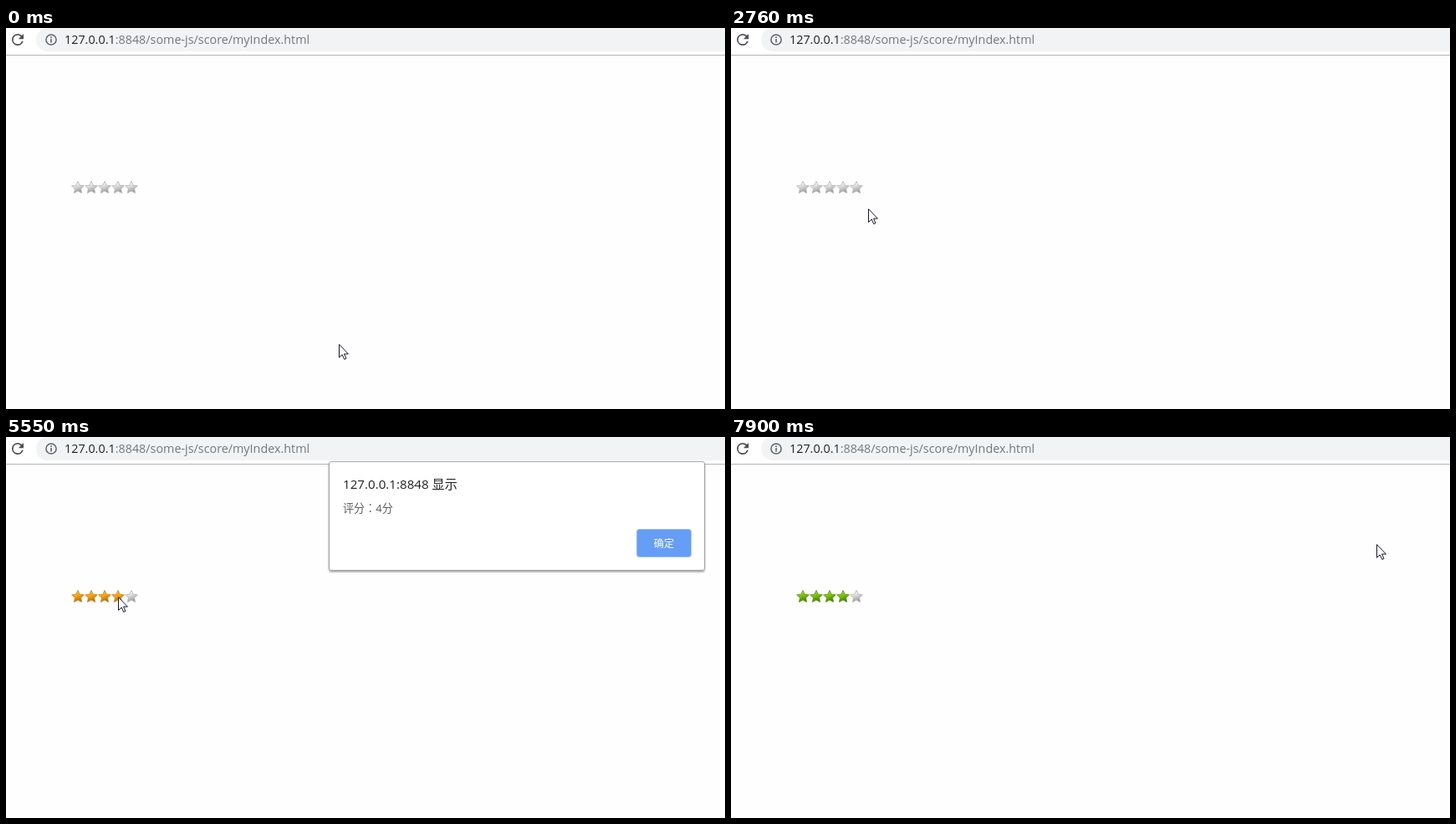
An HTML page for the animation above (8 s loop, 860 by 456 pixels).

```html
<!DOCTYPE html>
<html lang="zh-CN">
<head>
<meta charset="utf-8">
<title>Star rating</title>
<style>
  html, body { margin: 0; width: 100%; height: 100%; overflow: hidden; background: #fefefe; }
  svg { display: block; width: 100vw; height: 100vh; }
  text { font-family: "Open Sans", "Noto Sans CJK SC", "Noto Sans CJK", sans-serif; }
  .colon { font-family: "Noto Sans CJK TC", "Noto Sans CJK", sans-serif; }
  .silver { fill: url(#silver); stroke: #b2b2b2; }
  .gold { fill: url(#gold); stroke: #c08a2a; }
  .green { fill: url(#green); stroke: #5b9418; }
</style>
</head>
<body>
<svg viewBox="0 0 860 456">
  <defs>
    <linearGradient id="silver" x2=".35" y2="1">
      <stop offset=".3" stop-color="#f6f6f6"/><stop offset="1" stop-color="#9c9c9c"/>
    </linearGradient>
    <linearGradient id="gold" x2=".35" y2="1">
      <stop offset=".2" stop-color="#ffc038"/><stop offset=".6" stop-color="#f59c0a"/><stop offset="1" stop-color="#b86800"/>
    </linearGradient>
    <linearGradient id="green" x2=".35" y2="1">
      <stop offset=".2" stop-color="#a2da2c"/><stop offset=".6" stop-color="#74bb09"/><stop offset="1" stop-color="#3f8000"/>
    </linearGradient>
    <linearGradient id="tipFill" x2="0" y2="1">
      <stop stop-color="#fff"/><stop offset="1" stop-color="#e4e5f0"/>
    </linearGradient>
    <filter id="dialogShadow" x="-5%" y="-10%" width="110%" height="120%">
      <feDropShadow dx="0" dy="1.5" stdDeviation="1.2" flood-color="#000" flood-opacity=".4"/>
    </filter>
    <filter id="tipShadow" x="-20%" y="-20%" width="150%" height="150%">
      <feDropShadow dx="2.5" dy="2.5" stdDeviation=".7" flood-color="#000" flood-opacity=".5"/>
    </filter>
  </defs>

  <!-- browser bar -->
  <rect width="860" height="32" fill="#fff"/>
  <rect x="36" width="880" height="28" rx="14" fill="#f1f3f4"/>
  <rect y="32" width="860" height="1" fill="#b4b4b4"/>
  <path transform="translate(3.5 3.5) scale(.875)" fill="#4d5054"
    d="M17.65 6.35A7.96 7.96 0 0 0 12 4a8 8 0 1 0 7.73 10h-2.08A6 6 0 1 1 12 6c1.66 0 3.14.69 4.22 1.78L13 11h7V4z"/>
  <circle cx="54" cy="14" r="6.1" fill="none" stroke="#5f6368" stroke-width="1.5"/>
  <path d="M54 10.2v1.7M54 13v4.5" stroke="#5f6368" stroke-width="1.6"/>
  <text x="70" y="19" font-size="14.35" fill="#74787c"><tspan fill="#202124">127.0.0.1</tspan>:8848/some-js/score/myIndex.html</text>

  <g id="stars"></g>

  <g id="dialog">
    <rect x="386.5" y="29.5" width="449" height="130" rx="2.5" fill="#fff" stroke="#a8a8a8" filter="url(#dialogShadow)"/>
    <text x="403" y="62" font-size="15.15" fill="#202124">127.0.0.1:8848 显示</text>
    <text x="403" y="90" font-size="13.1" fill="#606060">评分<tspan class="colon" lang="zh-TW">：</tspan>4分</text>
    <rect id="button" x="754.5" y="110.5" width="65" height="33" rx="3" fill="#669df6" stroke="#98bdfa"/>
    <text x="787" y="132" font-size="12.2" fill="#fff" text-anchor="middle">确定</text>
  </g>

  <g id="tip">
    <rect x="134.5" y="211.5" width="31" height="21" rx="2" fill="url(#tipFill)" stroke="#767676" filter="url(#tipShadow)"/>
    <text x="140" y="226" font-size="12" fill="#606060">4分</text>
  </g>

  <path id="cursor" d="M.5 .7V16.4L4.2 13 6.7 18.5 9 17.5 6.5 12.1H11.4Z" fill="#fff" stroke="#15152a" stroke-width="1"/>
</svg>

<script>
const LOOP = 8000;
const START = [398, 378];
// Cursor legs: first step, last step, step count, end point, optional bend
const LEGS = [
  [150, 1110, 8, [110, 190]],
  [1240, 1810, 5, [155, 197], [122, 188]],
  [1930, 2180, 2, [159, 197]],
  [2300, 2760, 4, [164, 216]],
  [2910, 3300, 4, [132, 220], [152, 262]],
  [3420, 3830, 4, [134, 191]],
  [5690, 6380, 6, [570, 168], [350, 191]],
  [6530, 6650, 2, [730, 136]],
  [6800, 7070, 3, [772, 128]]
];
const STAR = { x: 78, y: 183, size: 16, count: 5 };
const byId = id => document.getElementById(id);

function starPoints(cx, cy) {
  return Array.from({ length: 10 }, (_, i) => {
    const angle = i * Math.PI / 5 - Math.PI / 2;
    const radius = i % 2 ? 3.8 : 7.8;
    return `${cx + radius * Math.cos(angle)},${cy + radius * Math.sin(angle)}`;
  }).join(" ");
}

const stars = Array.from({ length: STAR.count }, (_, i) => {
  const star = document.createElementNS("http://www.w3.org/2000/svg", "polygon");
  star.setAttribute("points", starPoints(STAR.x + STAR.size * (i + .5), STAR.y + 8.3));
  star.setAttribute("stroke-width", ".8");
  star.setAttribute("stroke-linejoin", "round");
  return byId("stars").appendChild(star);
});

function cursorAt(time) {
  let from = START;
  for (const [first, last, count, to, bend] of LEGS) {
    if (time < first) break;
    const interval = (last - first) / (count - 1);
    const step = Math.min(count, Math.floor((time - first) / interval + 1e-6) + 1);
    let p = step / count;
    if (count > 5) p = p * p * (3 - 2 * p);
    const mid = bend || from.map((v, i) => (v + to[i]) / 2);
    const point = from.map((v, i) =>
      Math.round((1 - p) ** 2 * v + 2 * p * (1 - p) * mid[i] + p * p * to[i]));
    if (step < count) return point;
    from = to;
  }
  return from;
}

function ratingAt(time, [x, y]) {
  if (time >= 5000) return 4;
  const column = Math.floor((x - STAR.x) / STAR.size);
  const inside = column >= 0 && column < STAR.count && y >= STAR.y && y < STAR.y + STAR.size;
  return inside ? column + 1 : 0;
}

// Dialog opacity and vertical offset
function dialogAt(time) {
  if (time < 4900 || time >= 7900) return [0, 0];
  if (time < 5020) return [.35, -12];
  if (time < 5140) return [.85, -3];
  return time < 7780 ? [1, 0] : [.35, -11];
}

function render(time) {
  const cursor = cursorAt(time);
  byId("cursor").setAttribute("transform", `translate(${cursor})`);

  const rating = ratingAt(time, cursor);
  const lit = time >= 7900 ? "green" : "gold";
  stars.forEach((star, i) => star.setAttribute("class", i < rating ? lit : "silver"));

  byId("tip").setAttribute("opacity", time < 4290 || time >= 4900 ? 0 : time < 4440 ? .85 : 1);

  const [opacity, offset] = dialogAt(time);
  byId("dialog").setAttribute("opacity", opacity);
  byId("dialog").setAttribute("transform", `translate(0 ${offset})`);
  byId("button").setAttribute("fill", time >= 7660 ? "#4a88ee" : "#669df6");
}

const begin = performance.now();
function tick() {
  render((performance.now() - begin) % LOOP);
  requestAnimationFrame(tick);
}
tick();
</script>
</body>
</html>
```
